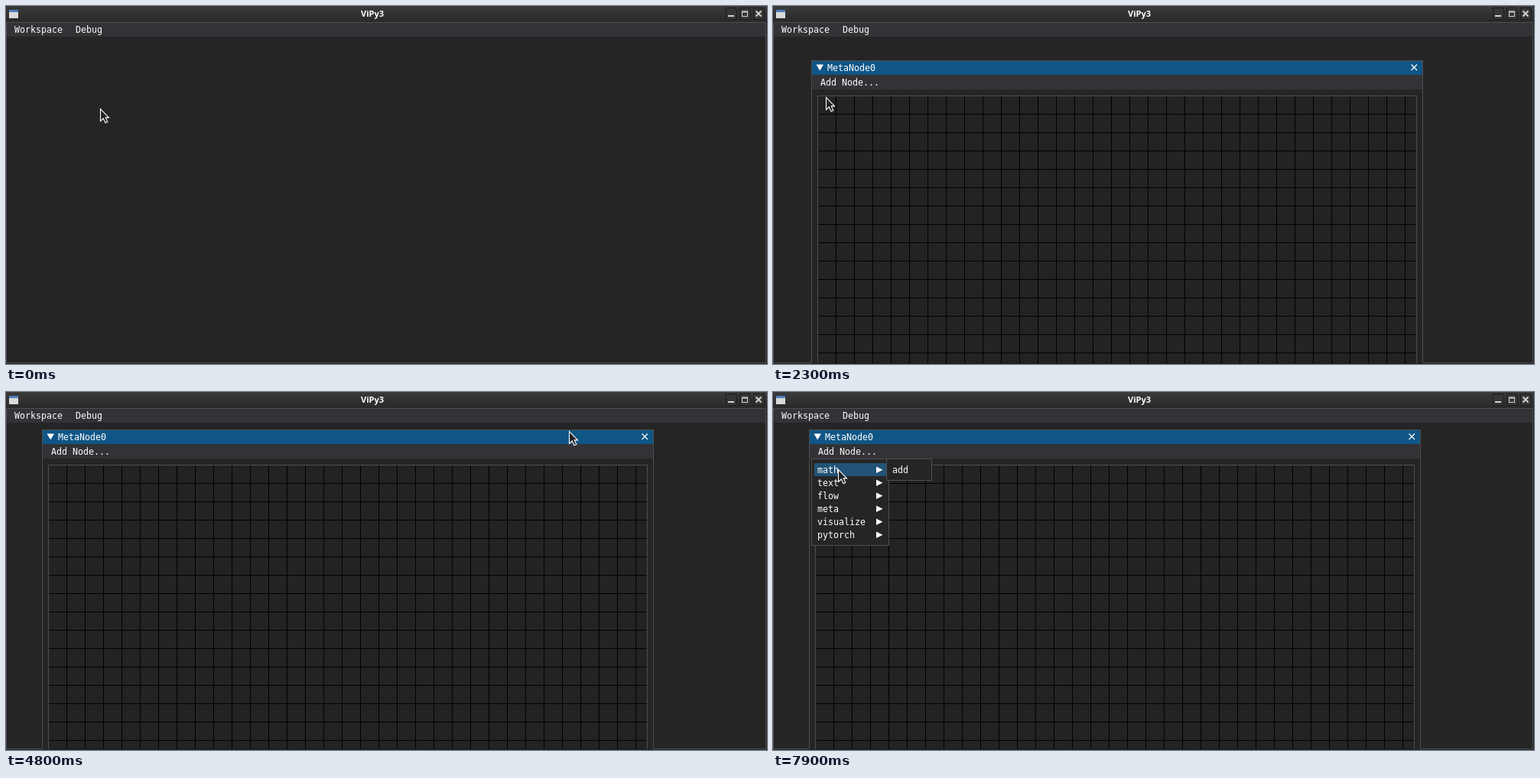
Write an HTML page that moves like this. It is 995 by 468 pixels and loops after 8 s.

```html
<!DOCTYPE html>
<html lang="en">
<head>
<meta charset="utf-8">
<title>ViPy3</title>
<style>
html, body { margin: 0; width: 100%; height: 100%; overflow: hidden; background: #252526; }
svg { display: block; width: 995px; height: 468px; }
text { font: 11.627px "DejaVu Sans Mono", monospace; fill: #fff; }
.caption { font: bold 11px "Open Sans", "Noto Sans", sans-serif; text-anchor: middle; }
.icon { fill: none; stroke: #d0d0d0; stroke-width: 2; }
rect, .grid { shape-rendering: crispEdges; }
</style>
</head>
<body>
<svg id="stage" viewBox="0 0 995 468">
  <defs>
    <linearGradient id="bar" x2="0" y2="1">
      <stop stop-color="#3b3b3b"/><stop offset="1" stop-color="#292929"/>
    </linearGradient>
    <clipPath id="client"><rect width="995" height="467"/></clipPath>
  </defs>
</svg>
<script>
const COLORS = { panel: '#252526', menu: '#333337', border: '#4e4e4e', title: '#0f5687',
  hover: '#225376', menuHover: '#2a5b80', canvas: '#232323' };
const LOOP = 8000, STEP = 100, ROW = 17;
const stage = document.getElementById('stage');

function add(parent, tag, attrs = {}, content = '') {
  const node = document.createElementNS('http://www.w3.org/2000/svg', tag);
  for (const key in attrs) node.setAttribute(key, attrs[key]);
  node.textContent = content;
  return parent.appendChild(node);
}
const group = parent => add(parent, 'g');
const box = (parent, x, y, width, height, fill) => add(parent, 'rect', { x, y, width, height, fill });
const label = (parent, x, y, content) => add(parent, 'text', { x, y }, content);
const path = (parent, d, attrs) => add(parent, 'path', { d, ...attrs });
function frame(parent, x, y, w, h, fill) {
  box(parent, x, y, w, h, COLORS.border);
  box(parent, x + 1, y + 1, w - 2, h - 2, fill);
}
const show = (node, visible) => node.setAttribute('display', visible ? 'inline' : 'none');
const move = (node, x, y) => node.setAttribute('transform', `translate(${x} ${y})`);

function drawDesktop() {
  box(stage, 0, 0, 995, 468, '#1f1f1f');
  box(stage, 0, 0, 995, 21, 'url(#bar)');
  frame(stage, 0, 21, 994, 446, COLORS.panel);
  box(stage, 1, 22, 992, 18, COLORS.menu);
  add(stage, 'text', { x: 479, y: 14, class: 'caption' }, 'ViPy3');
  box(stage, 4, 5, 12, 11, '#dadada');
  box(stage, 4, 5, 12, 3, '#4f7dbd');
  for (const x of [941, 959, 977]) {
    add(stage, 'rect', { x, y: 2.5, width: 14, height: 15, rx: 2, fill: '#363636', stroke: '#1b1b1b' });
  }
  path(stage, 'M944 13H952', { class: 'icon' });
  path(stage, 'M962 7.5H970', { class: 'icon' });
  add(stage, 'rect', { x: 962.5, y: 7.5, width: 7, height: 6, class: 'icon', style: 'stroke-width:1' });
  path(stage, 'M980.5 6.5L987.5 13.5M987.5 6.5L980.5 13.5', { class: 'icon' });
}

function drawNodeWindow(parent) {
  const win = group(parent);
  frame(win, 0, 0, 800, 500, COLORS.panel);
  box(win, 1, 1, 798, 18, COLORS.title);
  box(win, 1, 19, 798, 19, COLORS.menu);
  const collapse = add(win, 'circle', { cx: 11, cy: 9.5, r: 7.5, fill: '#1968b0' });
  path(win, 'M6.5 5.5H16L11.25 13.5Z', { fill: '#fff' });
  label(win, 21, 14, 'MetaNode0');
  path(win, 'M784.5 5.5L792 13M792 5.5L784.5 13', { stroke: '#fff', 'stroke-width': 1.2 });
  const header = box(win, 4, 19, 93, 19, COLORS.menuHover);
  label(win, 12, 33, 'Add Node...');
  frame(win, 8, 46, 784, 450, COLORS.canvas);
  let lines = '';
  for (let x = 32.5; x < 790; x += 24) lines += `M${x} 47V495`;
  for (let y = 70.5; y < 490; y += 24) lines += `M9 ${y}H791`;
  path(win, lines, { stroke: '#000', class: 'grid' });
  return { win, collapse, header };
}

function drawMenu(x, y, w, h, items, arrows) {
  const menu = group(stage);
  frame(menu, x, y, w, h, COLORS.panel);
  const mark = box(menu, x + 4, y + 6, w - 8, ROW, COLORS.hover);
  items.forEach((item, i) => {
    const base = y + 19 + i * ROW;
    label(menu, x + 8, base, item);
    if (arrows) path(menu, `M${x + 85} ${base - 8.5}V${base}L${x + 93.5} ${base - 4.25}Z`, { fill: '#fff' });
  });
  return { menu, mark, y };
}
function highlight({ mark, y }, row) {
  show(mark, row >= 0);
  mark.setAttribute('y', y + 6 + row * ROW);
}

drawDesktop();
const workspaceHover = box(stage, 4, 22, 79, 18, COLORS.menuHover);
label(stage, 11, 35, 'Workspace');
label(stage, 91, 35, 'Debug');
const clipped = add(stage, 'g', { 'clip-path': 'url(#client)' });
const { win, collapse, header } = drawNodeWindow(clipped);
const workspaceMenu = drawMenu(3, 40, 179, 97, ['Load Last Workspace', 'Load Workspace...',
  'Save Workspace', 'Save Workspace As...', 'New MetaNode']);
const nodeMenu = drawMenu(50, 87, 102, 114,
  ['math', 'text', 'flow', 'meta', 'visualize', 'pytorch'], true);
const mathMenu = drawMenu(148, 87, 60, 29, ['add']);
show(mathMenu.mark, false);
const pointer = group(stage);
path(pointer, 'M.5 .5V16.5L4.2 13L7 18.7L9.8 17.4L7.2 11.9H11.5Z',
  { fill: '#222', stroke: '#fff', 'stroke-width': 1.1 });

// Pointer keys: time, x, y
const route = [
  [100, 123, 134], [800, 50, 31], [900, 50, 31], [1200, 53, 76], [1500, 65, 129], [1600, 65, 129],
  [1800, 69, 119], [2500, 69, 119], [2700, 180, 136], [2900, 480, 125], [3100, 800, 86],
  [3200, 872, 73], [3300, 872, 73], [3700, 851, 70], [3800, 851, 70], [3900, 849, 69],
  [4300, 739, 73], [4700, 737, 53], [4800, 736, 51], [4900, 736, 51], [5300, 420, 61],
  [5600, 110, 50], [5800, 41, 42], [5900, 41, 42], [6200, 54, 69], [6400, 62, 76],
  [6700, 62, 76], [7100, 82, 100], [7800, 82, 100], [7900, 85, 101]
];
function pointerAt(t) {
  const next = route.findIndex(key => key[0] >= t);
  if (next < 0) return route[route.length - 1].slice(1);
  if (next === 0) return route[0].slice(1);
  const [t0, x0, y0] = route[next - 1], [t1, x1, y1] = route[next];
  const k = (t - t0) / (t1 - t0);
  return [Math.round(x0 + (x1 - x0) * k), Math.round(y0 + (y1 - y0) * k)];
}

function render(time) {
  const t = Math.floor(time % LOOP / STEP) * STEP;
  const within = (from, to) => t >= from && t < to;
  const [px, py] = pointerAt(t);
  move(pointer, px, py);

  show(workspaceHover, within(700, 1000));
  show(workspaceMenu.menu, within(1000, 2300));
  highlight(workspaceMenu, t < 1100 ? -1 : t < 1300 ? 0 : t < 1400 ? 2 : t < 1500 ? 3 : 4);

  const [dx, dy] = t < 4300 ? [739, 73] : t < 4800 ? [px, py] : [736, 51];
  show(win, t >= 2300);
  move(win, dx - 689, dy - 2);
  show(collapse, within(6100, 6300));
  show(header, within(6400, 6800));

  show(nodeMenu.menu, t >= 6600);
  highlight(nodeMenu, t >= 6900 ? 0 : -1);
  show(mathMenu.menu, t >= 7000);
}

const start = performance.now();
function tick() {
  render(performance.now() - start);
  requestAnimationFrame(tick);
}
tick();
</script>
</body>
</html>
```
